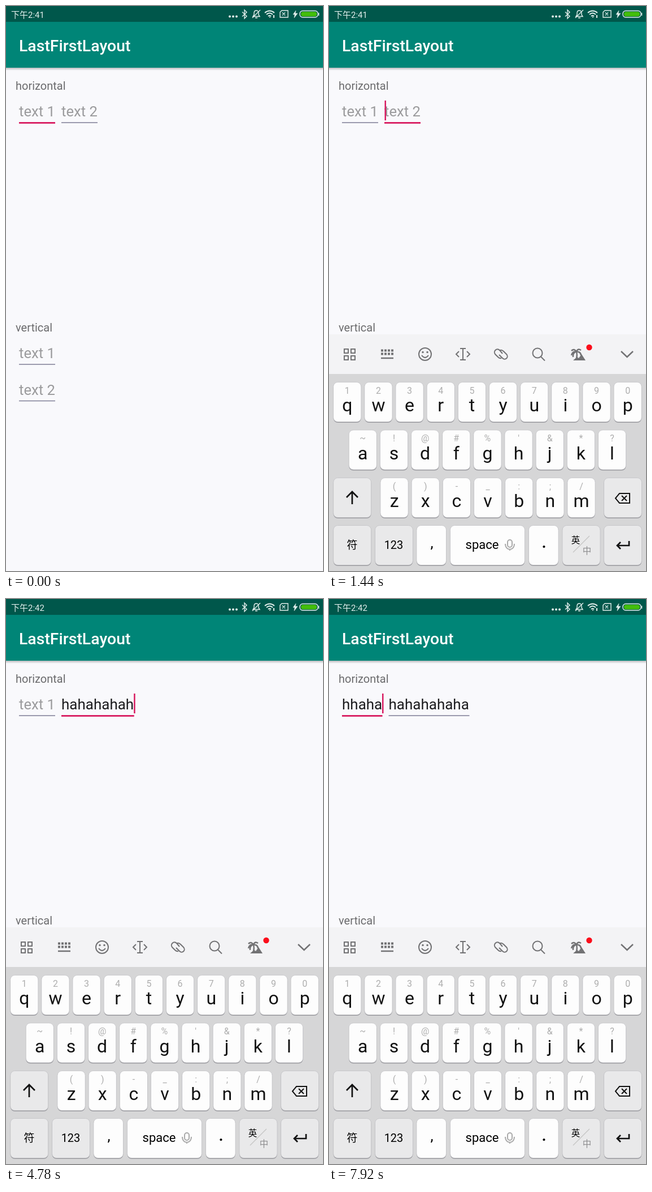
An HTML page that plays this animation: 561x998 px, repeating every 8000 ms.

```html
<!DOCTYPE html>
<html lang="en">
<head>
<meta charset="utf-8">
<title>LastFirstLayout</title>
<style>
  html, body { margin: 0; width: 100%; height: 100%; overflow: hidden; background: #f9f9fc; }
  svg { display: block; width: 100%; height: 100%; }
  text { font-family: Roboto, "Noto Sans CJK SC", "Noto Sans CJK", sans-serif; white-space: pre; }
  .mid { text-anchor: middle; }
  .line { fill: none; stroke-width: 2; }
  .label { font-size: 20px; fill: #6b6b6d; }
  .hint { font-size: 25.7px; fill: #9b9b9d; }
  .typed { font-size: 26px; fill: #1c1c1e; }
  .small { font-size: 16px; fill: #adadad; }
  .letter { font-size: 32px; fill: #111; }
</style>
</head>
<body>
<svg viewBox="0 0 561 998" xmlns="http://www.w3.org/2000/svg">
  <defs>
    <linearGradient id="shade" x2="0" y2="1">
      <stop stop-color="#000" stop-opacity=".3"/>
      <stop offset="1" stop-color="#000" stop-opacity="0"/>
    </linearGradient>
  </defs>
  <rect width="561" height="998" fill="#f9f9fc"/>
  <rect y="108" width="561" height="6" fill="url(#shade)"/>
  <rect y="28" width="561" height="81" fill="#008577"/>
  <rect width="561" height="28" fill="#00574b"/>
  <text x="23" y="80" font-size="28.4" font-weight="500" fill="#fff">LastFirstLayout</text>
  <text id="clock" x="9" y="20.5" font-size="15" fill="#e3eeec"></text>

  <g class="line" stroke="#e3eeec" style="stroke-width:1.4">
    <path d="M396 18.500h.01M402 18.500h.01M408 18.500h.01" stroke-width="4" stroke-linecap="round" style="stroke-width:4"/>
    <path d="M418 10.500l8 7.500-4 4V7l4 4-8 7.500"/>
    <path d="M437 18.500h12l-2-3v-3c0-6-8-6-8 0v3zM441 21h4M436 21L450 7"/>
    <path d="M458 12q8.500-7 17 0M461 15q5.500-5 11 0M464 18q2.500-2 5 0" stroke-width="2" style="stroke-width:2"/>
    <path d="M467 20.500v-1.500M474 16v5" style="stroke-width:2"/>
    <path d="M488 8h11v12h-14v-9zM489 11.500l5 5M494 11.500l-5 5"/>
    <path d="M513 8l-5 7h3l-1 6 6-8h-4z" fill="#e3eeec" style="stroke-width:.5"/>
    <rect x="520" y="8.500" width="32" height="11.500" rx="5"/>
    <rect x="522" y="10.300" width="28" height="8" rx="3.500" fill="#43be0b" stroke="none"/>
    <path d="M553.500 12v5"/>
  </g>

  <text class="label" x="17" y="147.500">horizontal</text>
  <text class="label" x="17" y="574.500">vertical</text>
  <g id="fields"></g>
  <rect id="caret" y="167" width="2.500" height="35" fill="#d81b60"/>

  <g id="keyboard">
    <rect y="580" width="561" height="70" fill="#f3f3f5"/>
    <rect y="650" width="561" height="348" fill="#d6d6d7"/>
    <g class="line" stroke="#727274">
      <path d="M27 606h7v7h-7zM39 606h7v7h-7zM27 618h7v7h-7zM39 618h7v7h-7z"/>
      <path d="M92 608.500h22M92 614.500h22" stroke-dasharray="4 2" style="stroke-width:4"/>
      <path d="M92 622h22" style="stroke-width:2.500"/>
      <circle cx="170" cy="615" r="11"/>
      <path d="M164 617q6 8 12 0"/>
      <path d="M166 611.500h.01M174 611.500h.01" stroke-linecap="round" style="stroke-width:3.500"/>
      <path d="M232 605h10M232 625h10M237 605v20M230 610l-5 5 5 5M244 610l5 5-5 5"/>
      <path d="M307 614l-5-6c-5-5-12 2-8 7l5 5q3 3 6 2M301 616l6 6c5 5 12-2 7-7l-5-5q-3-3-6-2"/>
      <circle cx="369" cy="613" r="8.500"/>
      <path d="M375 619.500l7 7"/>
      <path d="M438 611q2 7-1 14M438 611q-4-7-9-2M438 611q-7-2-9 6M438 611q2-7 8-3M438 611q7-1 8 6M436 611q-5 3-4 9" style="stroke-width:2.500"/>
      <path d="M432 626l7-6 3 2 5-7 7 11z" fill="#727274" stroke="none"/>
      <path d="M517 610l10.500 10 10.500-10" style="stroke-width:2.500"/>
    </g>
    <circle cx="460.500" cy="603" r="5.200" fill="#fb0d1b"/>
    <g id="keys"></g>
    <g class="line" stroke="#111" style="stroke-width:2.700">
      <path d="M41 880v-22M31 868l10-10 10 10"/>
      <path d="M507 869.500l7-8.500h18v17h-18zM518 865l9 9M527 865l-9 9" style="stroke-width:2"/>
      <path d="M531 945v8h-21M516 947l-6 6 6 6"/>
    </g>
    <g class="line" stroke="#aaa">
      <rect x="316" y="943" width="8" height="13" rx="4"/>
      <path d="M312 950c0 13 16 13 16 0M320 960v2"/>
      <path d="M432 965l29-29" stroke="#c4c4c4" style="stroke-width:1.200"/>
    </g>
    <g id="bubbles"></g>
  </g>
</svg>
<script>
const LOOP = 8000, ACCENT = '#d81b60', CHAR_W = 14.3, FIELD_W = 64;
const $ = id => document.getElementById(id);

function add(parent, tag, attrs, text = '') {
  const el = document.createElementNS('http://www.w3.org/2000/svg', tag);
  for (const name in attrs) el.setAttribute(name, attrs[name]);
  el.textContent = text;
  return parent.appendChild(el);
}

// Text fields
function makeField(hint, x, y) {
  const g = add($('fields'), 'g', { transform: `translate(${x} ${y})` });
  return {
    hint, g, y,
    text: add(g, 'text', { y: -11, class: 'hint' }, hint),
    line: add(g, 'rect', { y: -.8, width: FIELD_W, height: 1.6, fill: '#85849c' })
  };
}
const fields = [makeField('text 1', 23, 206), makeField('text 2', 98, 206)];
makeField('text 1', 23, 633);
makeField('text 2', 23, 697.5);

function drawField(field, x, value, focused) {
  const width = Math.max(FIELD_W, value.length * CHAR_W);
  field.g.setAttribute('transform', `translate(${x} ${field.y})`);
  field.text.textContent = value || field.hint;
  field.text.setAttribute('class', value ? 'typed' : 'hint');
  field.line.setAttribute('width', width);
  field.line.setAttribute('y', focused ? -1 : -.8);
  field.line.setAttribute('height', focused ? 2.8 : 1.6);
  field.line.setAttribute('fill', focused ? ACCENT : '#85849c');
  return x + width;
}

// Keyboard
const keys = {};
function makeKey(x, y, width, fill) {
  const shape = { x, width, height: 70, rx: 8 };
  add($('keys'), 'rect', { ...shape, y: y + 1.5, fill: '#97979c' });
  return add($('keys'), 'rect', { ...shape, y, fill, stroke: '#bebec2', 'stroke-width': .7 });
}
function keyText(x, y, text, className, attrs = {}) {
  add($('keys'), 'text', { x, y, class: 'mid ' + className, ...attrs }, text);
}

[['qwertyuiop', '1234567890', 7.7, 664.5],
 ['asdfghjkl', "~!@#%'&*?", 35.2, 749],
 ['zxcvbnm', '()-_:;/', 91, 833.5]].forEach(([letters, marks, left, y]) => {
  [...letters].forEach((letter, i) => {
    const x = left + i * 55.15, mid = x + 24.6;
    keys[letter] = { rect: makeKey(x, y, 49.2, '#fdfdfd'), mid, y };
    keyText(mid, y + 20, marks[i], 'small');
    keyText(mid, y + 51.5, letter, 'letter');
  });
});

makeKey(7.7, 833.5, 67, '#e9e9ea');
makeKey(486.5, 833.5, 67, '#e9e9ea');
[[7.7, 67, '#e9e9ea'], [81.5, 67, '#e9e9ea'], [155, 52.5, '#fdfdfd'], [214.5, 132, '#fdfdfd'],
 [353.5, 52.5, '#fdfdfd'], [413, 67, '#e9e9ea'], [486.5, 67, '#e9e9ea']]
  .forEach(([x, width, fill]) => makeKey(x, 917.5, width, fill));
keyText(41, 959, '符', '', { 'font-size': 19 });
keyText(114.5, 959, '123', '', { 'font-size': 20 });
keyText(182, 957, ',', '', { 'font-size': 26 });
keyText(271, 959, 'space', '', { 'font-size': 22 });
keyText(380.5, 957, '.', '', { 'font-size': 26, 'font-weight': 700 });
keyText(436.5, 949, '英', '', { 'font-size': 15.5, 'font-weight': 500 });
keyText(456.5, 968, '中', '', { 'font-size': 15.5, fill: '#8d8d8f' });

for (const letter of 'ha') {
  const key = keys[letter];
  const g = add($('bubbles'), 'g', { transform: `translate(${key.mid} ${key.y - 49})` });
  add(g, 'circle', { cy: 1.2, r: 39.3, fill: '#b5b5b8' });
  add(g, 'circle', { r: 38.7, fill: '#fcfcfc', stroke: '#cfcfd1', 'stroke-width': .8 });
  add(g, 'text', { y: 11, class: 'mid', 'font-size': 35, fill: '#59595b' }, letter);
  key.bubble = g;
}

// Key presses: letter, down, up, field
const presses = [...'hahahahah'].map((c, i) => [c, 3060 + i * 185, 3140 + i * 185, 1]);
presses.push(['a', 4970, 5110, 1], ['h', 6830, 6930, 0], ['h', 7130, 7210, 0],
  ['a', 7310, 7390, 0], ['h', 7480, 7560, 0], ['a', 7670, 7750, 0]);

const FOCUS_SECOND = 100, FOCUS_FIRST = 6060, BUBBLE_LAG = 150;
const caretOn = [[100, 940], [1440, 1960], [2440, 2940], [3140, 5740], [6060, 6610], [6930, LOOP]];
const within = (t, from, to) => t >= from && t < to;
const show = (el, on) => el.setAttribute('visibility', on ? 'visible' : 'hidden');

function render(t) {
  const focus = within(t, FOCUS_SECOND, FOCUS_FIRST) ? 1 : 0;
  const typed = ['', ''];
  for (const [letter, , up, field] of presses) if (t >= up) typed[field] += letter;

  const end = drawField(fields[0], 23, typed[0], focus === 0);
  drawField(fields[1], end + 11, typed[1], focus === 1);
  const caretX = (focus ? end + 11 : 23) + typed[focus].length * CHAR_W;
  $('caret').setAttribute('x', caretX + (typed[focus] ? -.5 : .5));
  show($('caret'), caretOn.some(([from, to]) => within(t, from, to)));
  $('clock').textContent = t < 2440 ? '下午2:41' : '下午2:42';

  const slide = Math.min(1, Math.max(0, (t - 250) / 540));
  $('keyboard').setAttribute('transform', `translate(0 ${418 * (1 - slide) ** 3.62})`);

  for (const letter of 'ha') {
    const key = keys[letter], own = presses.filter(p => p[0] === letter);
    const down = own.some(([, from, to]) => within(t, from, to));
    key.rect.setAttribute('fill', down ? '#c6c6c9' : '#fdfdfd');
    show(key.bubble, own.some(([, from, to]) => within(t, Math.max(from, to - 80), to + BUBBLE_LAG)));
  }
}

const start = performance.now();
function tick() {
  render((performance.now() - start) % LOOP);
  requestAnimationFrame(tick);
}
tick();
</script>
</body>
</html>
```
